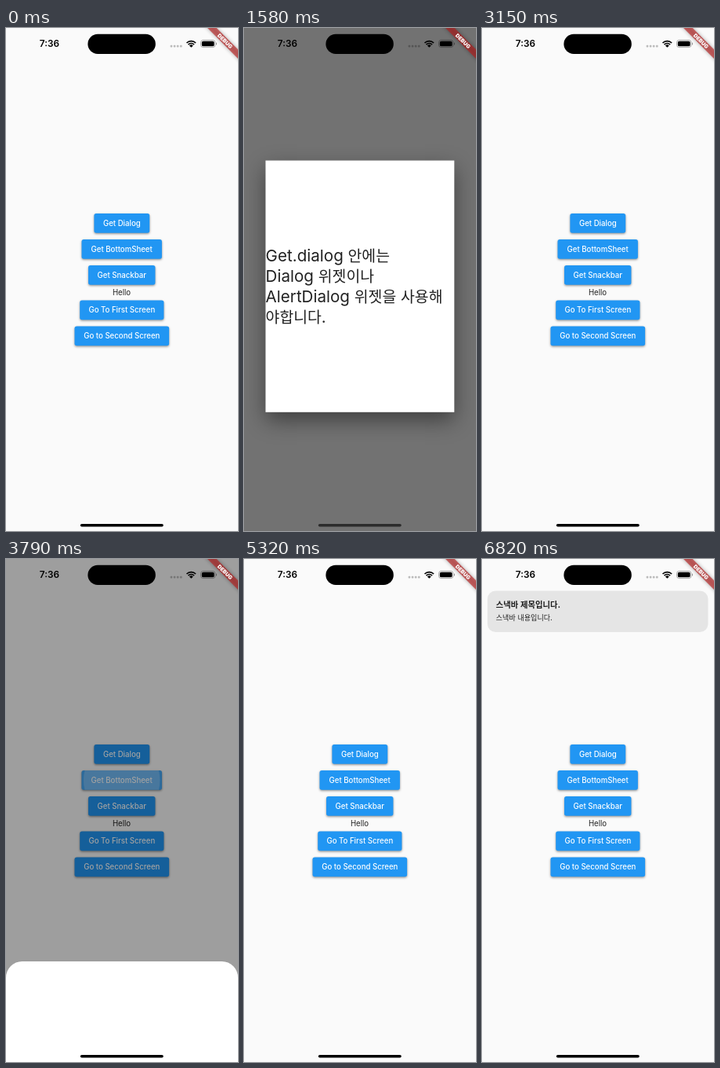
These frames come from a looping animation (296x640 px, 8 s). An HTML page with a canvas:

```html
<!DOCTYPE html>
<html lang="ko">
<head>
<meta charset="utf-8">
<title>Overlay demo</title>
<style>
  html, body { margin: 0; width: 100%; height: 100%; overflow: hidden; background: #fafafa; }
  canvas { display: block; width: 296px; height: 640px; }
</style>
</head>
<body>
<canvas id="stage"></canvas>
<script>
const W = 296, H = 640, LOOP = 8000;
const LATIN = 'Inter, "Liberation Sans", sans-serif';
const HANGUL = '"Noto Sans CJK KR", "Noto Sans CJK", sans-serif';
const INK = 'rgba(0,0,0,.87)';

const canvas = document.getElementById('stage');
const ctx = canvas.getContext('2d');
const dpr = window.devicePixelRatio || 1;
canvas.width = W * dpr;
canvas.height = H * dpr;

// Spans that play at a low frame rate: start, end, intervals
const SPANS = [
  [1160, 1580, 4], [2810, 3150, 3], [3560, 4010, 4], [5100, 5320, 2], [5680, 6820, 10]
];

// label, left, top, width, time of press
const BUTTONS = [
  ['Get Dialog', 112.4, 236, 70.8, 1120],
  ['Get BottomSheet', 96.5, 269, 102.4, 3520],
  ['Get Snackbar', 105, 302, 85.4, 5640],
  ['Go To First Screen', 94.2, 346.4, 107.2],
  ['Go to Second Screen', 87.5, 379.4, 120.6]
];
const BTN_H = 24.8;

const clamp = v => Math.max(0, Math.min(1, v));
const ramp = (t, start, dur) => clamp((t - start) / dur);
const outQuad = v => 1 - (1 - v) ** 2;
const outCirc = v => Math.sqrt(1 - (v - 1) ** 2);

// cubic-bezier(.25, .1, .25, 1)
function ease(x) {
  if (x <= 0 || x >= 1) return clamp(x);
  const bez = (a, b, s) => 3 * a * s * (1 - s) ** 2 + 3 * b * s * s * (1 - s) + s ** 3;
  let lo = 0, hi = 1;
  for (let i = 0; i < 24; i++) {
    const mid = (lo + hi) / 2;
    if (bez(.25, .25, mid) < x) lo = mid; else hi = mid;
  }
  return bez(.1, 1, lo);
}

function snap(t) {
  for (const [a, b, n] of SPANS) {
    if (t >= a && t < b) {
      const step = (b - a) / n;
      return a + Math.floor((t - a) / step) * step;
    }
  }
  return t;
}

function box(x, y, w, h, r, fill) {
  ctx.beginPath();
  ctx.roundRect(x, y, w, h, r);
  ctx.fillStyle = fill;
  ctx.fill();
}

function shadow(color, blur, dy) {
  ctx.shadowColor = color;
  ctx.shadowBlur = blur * dpr;
  ctx.shadowOffsetY = dy * dpr;
}

function label(str, x, y, size, weight, fill, align = 'left') {
  ctx.font = `${weight} ${size}px ${LATIN}`;
  ctx.textAlign = align;
  ctx.fillStyle = fill;
  ctx.fillText(str, x, y);
}

// Latin and Hangul runs on one baseline
function mixed(str, x, y, size, weight, fill) {
  ctx.textAlign = 'left';
  ctx.fillStyle = fill;
  for (const run of str.match(/[가-힣]+|[^가-힣]+/g)) {
    const isHangul = /[가-힣]/.test(run);
    ctx.font = `${weight} ${isHangul ? size * .94 : size}px ${isHangul ? HANGUL : LATIN}`;
    ctx.fillText(run, x, y);
    x += ctx.measureText(run).width;
  }
}

function button([text, x, y, w, press], t) {
  ctx.save();
  shadow('rgba(0,0,0,.42)', 3, 1.3);
  box(x, y, w, BTN_H, 2.75, '#2196f3');
  ctx.restore();

  const age = t - press;
  if (age > 0 && age < 620) {
    const fade = 1 - ramp(age, 350, 270);
    ctx.save();
    ctx.beginPath();
    ctx.roundRect(x, y, w, BTN_H, 2.75);
    ctx.clip();
    ctx.fillStyle = `rgba(255,255,255,${.16 * fade * ramp(age, 0, 120)})`;
    ctx.fillRect(x, y, w, BTN_H);
    ctx.beginPath();
    ctx.arc(x + w / 2, y + BTN_H / 2, w * .5 * ramp(age, -40, 320), 0, 7);
    ctx.fillStyle = `rgba(255,255,255,${.24 * fade})`;
    ctx.fill();
    ctx.restore();
  }
  label(text, x + w / 2, y + 15.8, 9.63, 500, '#fff', 'center');
}

function home(t) {
  ctx.fillStyle = '#fafafa';
  ctx.fillRect(0, 0, W, H);
  for (const b of BUTTONS) button(b, t);
  label('Hello', 147.5, 339.8, 9.63, 400, INK, 'center');
}

function barrier(v) {
  ctx.fillStyle = `rgba(0,0,0,${.54 * ease(v)})`;
  ctx.fillRect(0, 0, W, H);
}

function dialog(v) {
  if (v <= 0) return;
  barrier(v);
  ctx.save();
  ctx.globalAlpha = outQuad(v);
  ctx.save();
  shadow('rgba(0,0,0,.45)', 26, 10);
  ctx.fillStyle = '#fff';
  ctx.fillRect(27.5, 168.6, 240.8, 320.2);
  ctx.restore();
  ['Get.dialog 안에는', 'Dialog 위젯이나', 'AlertDialog 위젯을 사용해', '야합니다.']
    .forEach((line, i) => mixed(line, 27.6, 296.6 + i * 26, 20.6, 400, INK));
  ctx.restore();
}

function sheet(v) {
  if (v <= 0) return;
  barrier(v);
  const top = H - 320 * v;
  box(0, top, W, 320, 20.6, '#fff');
  mixed('Get의 바텀시트입니다.', 103.7, top + 162.6, 9.63, 400, INK);
}

function snackbar(t) {
  if (t <= 5800) return;
  const dy = -273 * (1 - outCirc(ramp(t, 5800, 1000)));
  box(7, 40.4 + dy, 281.4, 52.6, 10.3, 'rgba(158,158,158,.23)');
  mixed('스낵바 제목입니다.', 17.8, 61.8 + dy, 11, 700, INK);
  mixed('스낵바 내용입니다.', 17.8, 78.4 + dy, 9.63, 400, INK);
}

function banner() {
  ctx.save();
  ctx.translate(W, 0);
  ctx.rotate(Math.PI / 4);
  ctx.save();
  shadow('rgba(0,0,0,.5)', 5, 0);
  ctx.fillStyle = 'rgba(183,28,28,.627)';
  ctx.fillRect(-40, 19.27, 80, 8.26);
  ctx.restore();
  label('DEBUG', 0, 25.9, 6.8, 900, '#fff', 'center');
  ctx.restore();
}

function wifi(x, y) {
  ctx.save();
  ctx.strokeStyle = ctx.fillStyle = '#000';
  ctx.lineWidth = 1.7;
  const from = -Math.PI * .75, to = -Math.PI * .25;
  for (const r of [8.2, 5.3]) {
    ctx.beginPath();
    ctx.arc(x, y, r, from, to);
    ctx.stroke();
  }
  ctx.beginPath();
  ctx.moveTo(x, y);
  ctx.arc(x, y, 3.4, from, to);
  ctx.fill();
  ctx.restore();
}

function system(dim) {
  label('7:36', 55.4, 24.3, 11.8, 600, '#000', 'center');
  box(104.4, 7.8, 86.4, 25.2, 12.6, '#000');
  for (let i = 0; i < 4; i++) box(209.6 + i * 4.1, 21.8, 2.7, 2.7, .9, 'rgba(0,0,0,.25)');
  wifi(236.3, 24.8);
  ctx.beginPath();
  ctx.roundRect(248.5, 15.4, 18.4, 9.2, 3);
  ctx.strokeStyle = 'rgba(0,0,0,.4)';
  ctx.lineWidth = .8;
  ctx.stroke();
  box(249.8, 16.7, 15.8, 6.6, 1.9, '#000');
  box(268, 18.4, 1, 3.2, .6, 'rgba(0,0,0,.4)');
  const tone = Math.round(44 * dim);
  box(94.8, 631, 106, 3.6, 1.8, `rgb(${tone},${tone},${tone})`);
}

function draw(t) {
  ctx.setTransform(dpr, 0, 0, dpr, 0, 0);
  const dialogV = t < 2790 ? ramp(t, 1275, 300) : 1 - ramp(t, 2790, 300);
  const sheetV = t < 5105 ? ramp(t, 3685, 250) : 1 - ramp(t, 5105, 200);
  home(t);
  dialog(dialogV);
  sheet(sheetV);
  snackbar(t);
  banner();
  system(dialogV);
}

const began = performance.now();
function tick() {
  draw(snap((performance.now() - began) % LOOP));
  requestAnimationFrame(tick);
}
tick();
</script>
</body>
</html>
```
